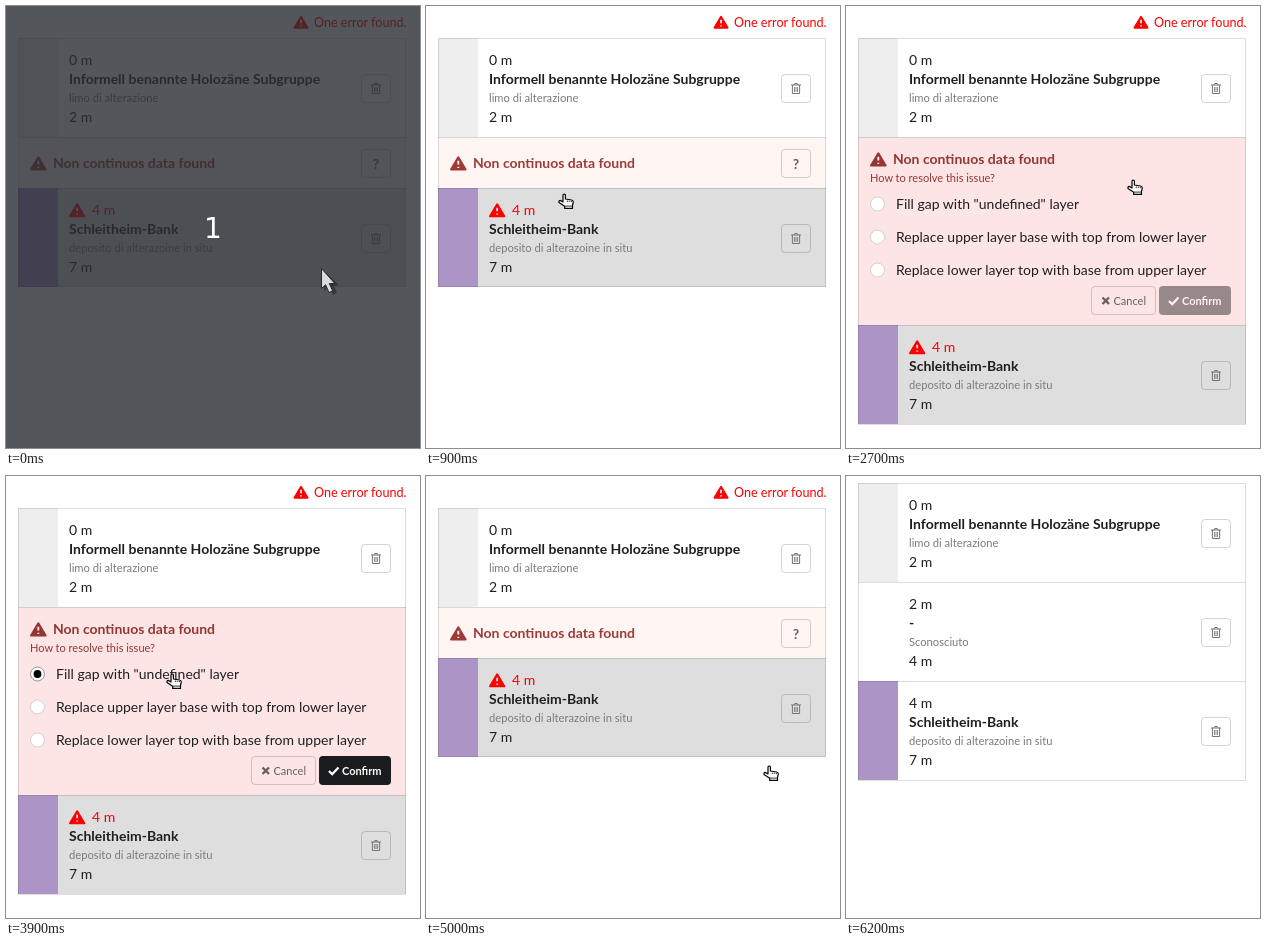
An HTML page for the animation above (6.8 s loop, 414 by 442 pixels).

```html
<!DOCTYPE html>
<html lang="en">
<head>
<meta charset="utf-8">
<title>Layer list</title>
<style>
  html, body { margin: 0; width: 100%; height: 100%; overflow: hidden; background: #fff; }
  svg { display: block; width: 414px; height: 442px; font: 14px Lato, sans-serif; --row: #fff6f4; --warn: #9f3a38; }
  text { fill: #1e1f20; white-space: pre; }
  .bold { font-weight: 700; }
  .note { font-size: 11.2px; fill: #7b7b7b; }
  .red { fill: #f00; }
  .warn { fill: var(--warn); }
  .small { font-size: 11px; }
  .line { fill: none; stroke: #22242626; }
  .button { fill: none; stroke: #22242633; }
</style>
</head>
<body>
<svg id="stage" viewBox="0 0 414 442"></svg>
<script>
const LOOP = 6800;
const stage = document.getElementById('stage');

const rect = (x, y, w, h, fill) => `<rect x="${x}" y="${y}" width="${w}" height="${h}" fill="${fill}"/>`;
const text = (x, y, words, cls = '') => `<text x="${x}" y="${y}" class="${cls}">${words}</text>`;
const group = (id, content) => `<g id="${id}">${content}</g>`;
const button = (x, y, w, id = '') =>
  `<rect id="${id}" class="button" x="${x + .5}" y="${y + .5}" width="${w - 1}" height="28" rx="3.5"/>`;
const hline = y => `<path class="line" d="M12 ${y + .5}H400"/>`;

const triangle = (x, y, scale, color, hole) => `
  <g transform="translate(${x} ${y}) scale(${scale})">
    <path d="M8 1.3L15 13H1Z" fill="${color}" stroke="${color}" stroke-width="2" stroke-linejoin="round"/>
    <path d="M8 4.6V8.2M8 10.4V11.6" stroke="${hole}" stroke-width="1.8"/>
  </g>`;

const trash = y => button(355, y, 30) + `
  <g transform="translate(365 ${y + 9})" fill="none" stroke="#737373">
    <path d="M0 2H10M3 2L3.8 .5H6.2L7 2M1.4 2V10.5H8.6V2"/>
    <path d="M3.5 4V9M5 4V9M6.5 4V9" stroke-width=".8"/>
  </g>`;

function layer(y, swatch, fill, top, name, note, base, hasError) {
  return rect(12, y, 388, 99, fill) + rect(12, y, 40, 99, swatch) +
    (hasError ? triangle(63, y + 15, 1.02, '#f00', fill) : '') +
    text(hasError ? 86 : 63, y + 27, top, hasError ? 'red' : '') +
    text(63, y + 46, name, 'bold') + text(63, y + 63.5, note, 'note') +
    text(63, y + 84, base) + trash(y + 36);
}

const frame = (y, h) => `<rect class="line" x="12.5" y="${y + .5}" width="387" height="${h - 1}"/>`;
const upper = y => layer(y, '#eee', '#fff', '0 m', 'Informell benannte Holozäne Subgruppe', 'limo di alterazione', '2 m');
const lower = (y, fill, hasError) =>
  layer(y, '#ac94c7', fill, '4 m', 'Schleitheim-Bank', 'deposito di alterazoine in situ', '7 m', hasError);

const warning = (y, h) => rect(12, 131, 388, h, 'var(--row)') +
  triangle(24, y - 12, 1.04, 'var(--warn)', 'var(--row)') +
  text(47, y, 'Non continuos data found', 'bold warn');

const radio = (y, label) =>
  `<circle cx="31.5" cy="${y}" r="7" fill="#fff" stroke="#d4d0d0"/>` + text(50, y + 5, label);

const collapsed = warning(162, 51) + button(355, 143, 30, 'help') +
  '<text x="370" y="162.5" class="bold" text-anchor="middle" style="fill:#606060">?</text>' +
  lower(182, '#dedede', true) + hline(131) + hline(182) + frame(32, 249);

const expanded = warning(158, 188) + text(24, 176, 'How to resolve this issue?', 'small warn') +
  radio(198, 'Fill gap with "undefined" layer') +
  radio(231, 'Replace upper layer base with top from lower layer') +
  radio(264, 'Replace lower layer top with base from upper layer') +
  group('dot', '<circle cx="31.5" cy="198" r="7" fill="none" stroke="#a5a1a1"/><circle cx="31.5" cy="198" r="3.9"/>') +
  button(245, 280, 65) +
  '<path d="M256.5 291.5L263 298M263 291.5L256.5 298" stroke="#66605f" stroke-width="2.4"/>' +
  '<text x="267.5" y="299" class="small" style="fill:#66605f">Cancel</text>' +
  group('confirm', '<rect x="313" y="280" width="72" height="29" rx="4" fill="#1b1c1d"/>' +
    '<path d="M323 295L326.2 298.2L332.5 291.5" fill="none" stroke="#fff" stroke-width="2.3"/>' +
    '<text x="336" y="299" class="small bold" style="fill:#fff">Confirm</text>') +
  lower(319, '#dedede', true) + hline(131) + hline(319) + frame(32, 387);

const resolved = upper(7) + layer(106, '#fff', '#fff', '2 m', '-', 'Sconosciuto', '4 m') +
  lower(205, '#fff') + hline(106) + hline(205) + frame(7, 298);

const hand = `
  <path d="M5 9V1.9Q6.2 .1 7.4 1.9V6L13.5 7Q15.4 7.4 15.3 9.2L14.5 12.4V15.4H6.7V13.2L1 9.4Q.6 7.3 2.6 7.4Z"
    fill="#fff" stroke="#000" stroke-width="1.2" stroke-linejoin="round"/>
  <path d="M9.3 7.5V9M11.3 7.7V9M13.3 8V9.2M7 13.1H14.4" stroke="#000" stroke-width=".8"/>`;
const arrow = `
  <path d="M3 3V23L8 19L12 27L16 25L13 18L18 17Z" fill="#0005"/>
  <path d="M.5 .5V20.5L4.6 16.8L8 24.5L11.6 22.8L8.3 15.5H13.8Z" fill="#dadada" stroke="#26282c"/>`;

stage.innerHTML =
  group('issue',
    triangle(287.5, 9.5, .94, '#f00', '#fff') +
    '<text x="308" y="20.5" class="red" style="font-size:12.6px">One error found.</text>' + upper(32)) +
  group('collapsed', collapsed) + group('expanded', expanded) + group('resolved', resolved) +
  group('countdown', '<rect width="414" height="442" fill="#282c33" opacity=".8"/>' +
    '<text x="207" y="232" text-anchor="middle" style="font:28px \'DejaVu Sans\',sans-serif;fill:#fff">1</text>') +
  group('arrow', arrow) + group('hand', hand);

const part = Object.fromEntries([...stage.querySelectorAll('[id]')].map(e => [e.id, e]));

// Each track lists [start time, value...]; a value holds until the next step.
const tracks = {
  view: [[0, 'collapsed'], [2700, 'expanded'], [4900, 'collapsed'], [5100, 'resolved']],
  shade: [[0, 1], [100, .75], [200, .5], [300, .25], [400, 0]],
  hover: [[0, 0], [1000, 1], [1700, 0], [1900, 1], [4900, 0]],
  press: [[0, 0], [2500, 1], [2700, 0]],
  confirm: [[0, .45], [3400, .45], [3500, .75], [3600, 1]],
  chosen: [[0, 0], [3400, 1]],
  pointer: [
    [0, 'arrow', 315, 262], [300, 'arrow', 280, 250], [400, 'hand', 240, 244],
    [700, 'hand', 200, 225], [800, 'hand', 160, 203], [900, 'hand', 132, 187],
    [1000, 'hand', 126, 176], [1100, 'hand', 125, 168], [1200, 'hand', 127, 162], [1300, 'hand', 128, 158],
    [1500, 'hand', 342, 172],
    [1700, 'hand', 400, 166], [1800, 'hand', 396, 160], [1900, 'hand', 380, 155],
    [2000, 'hand', 370, 152], [2200, 'hand', 367, 152],
    [2700, 'hand', 281, 173], [2900, 'hand', 200, 192], [3000, 'hand', 90, 198], [3100, 'hand', 25, 195],
    [3900, 'hand', 160, 197], [4000, 'hand', 240, 235], [4100, 'hand', 300, 270],
    [4200, 'hand', 328, 288], [4300, 'hand', 336, 294],
    [4900, 'hand', 337, 289], [5300, 'hand', 337, 290],
    [6100, 'hand', 63, 118], [6200, 'none', 0, 0]
  ]
};
const at = (name, time) => tracks[name].findLast(step => step[0] <= time).slice(1);
const show = (element, visible) => element.style.display = visible ? '' : 'none';

function draw(now) {
  const time = now % LOOP;
  const get = name => at(name, time)[0];
  const view = get('view');
  for (const name of ['collapsed', 'expanded', 'resolved']) show(part[name], name === view);
  show(part.issue, view !== 'resolved');
  stage.style.setProperty('--row', get('hover') ? '#fee5e5' : '#fff6f4');
  stage.style.setProperty('--warn', get('hover') ? '#943634' : '#9f3a38');
  part.help.style.fill = get('press') ? '#00000014' : 'none';
  part.confirm.style.opacity = get('confirm');
  show(part.dot, get('chosen'));
  part.countdown.style.opacity = get('shade');

  const [kind, x, y] = at('pointer', time);
  for (const name of ['arrow', 'hand']) {
    show(part[name], name === kind);
    part[name].setAttribute('transform', `translate(${x} ${y})`);
  }
}

function tick() {
  draw(performance.now());
  requestAnimationFrame(tick);
}
tick();
</script>
</body>
</html>
```
